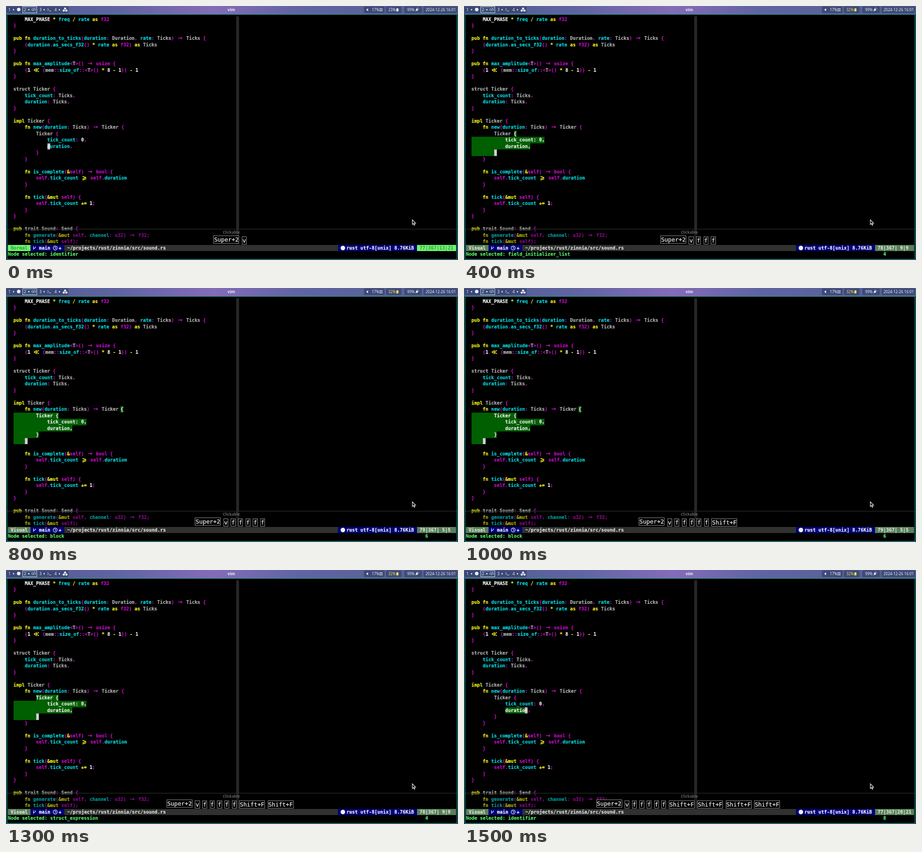
Write an HTML page that moves like this. It is 960x540 px and loops after 1.6 s.

```html
<!DOCTYPE html>
<html lang="en">
<head>
<meta charset="utf-8">
<title>Editor node selection</title>
<style>
  html, body { margin: 0; width: 100%; height: 100%; overflow: hidden; background: #000; }
  #stage {
    position: relative; width: 960px; height: 540px; overflow: hidden; background: #000;
    font: bold 9.95px/13.5px "DejaVu Sans Mono", monospace;
    -webkit-text-stroke: .22px currentColor;
  }
  #stage div, #stage > svg { position: absolute; white-space: pre; }
  #stage > svg { left: 0; top: 0; font: 8px "Noto Sans", sans-serif; -webkit-text-stroke: 0; }
  #stage .row { height: 13.5px; }
  .keyword { color: #eded1c; }
  .name { color: #08d5db; }
  .type { color: #adadad; }
  .mark { color: #c20bc2; }
  .plain { color: #ededed; }
  .wide {
    display: inline-block; width: 2ch; height: 10px; text-align: center; line-height: 10px;
    font-family: "DejaVu Sans", sans-serif;
  }
  .wide i { display: block; margin: 0 -4px; font-style: normal; font-size: 12px; }
  .selected { background: #005f00; color: #f0f0f0; }
  .cursor { background: #bababa; color: #ececec; }
  #split { left: 489px; top: 22px; width: 6px; height: 485px; background: #262826; }
  #shade { left: 2px; right: 2px; top: 474px; height: 33px; background: rgba(0,0,0,.3); border-top: 1px solid #303434; }
  #caption {
    left: 0; width: 957px; top: 475px; text-align: center; color: #626262;
    font: bold 8px/12px "Noto Sans", sans-serif; -webkit-text-stroke: 0;
  }
  #keys {
    left: 0; width: 957px; top: 488px; display: flex; justify-content: center;
    color: #f0f0f0; font: 12.4px/15px "DejaVu Sans Mono", monospace;
  }
  #keys span {
    flex: none; height: 15px; margin: 1.5px 5.4px 0 0; padding: 0 .4px;
    border: 1px solid #8c8c8c; background: #000;
  }
  #keys span:first-child { margin-top: 0; }
  #status div { height: 13.5px; top: 507.75px; }
  #path { left: 124px; width: 581px; background: #303230; color: #dce0dc; }
  .blue { background: #00007c; color: #ededf5; }
  .mode { background: #5a7f5c; color: #d6e6d2; }
  .normal .mode { background: #6cf76c; color: #3da548; }
  #message, #count { top: 521.25px; color: #58ec68; }
</style>
</head>
<body>
<div id="stage">
  <div id="split"></div>
  <div id="code"></div>
  <div id="selection"></div>
  <div id="shade"></div>
  <div id="caption">Clickable</div>
  <div id="keys"></div>
  <div id="status">
    <div id="path"> ~/projects/rust/zinnia/src/sound.rs</div>
    <div id="mode" class="mode" style="left:4px;width:48px"></div>
    <div class="blue" style="left:52px;width:72px">   main   +</div>
    <div class="blue" style="left:705px;width:167.5px">   rust utf-8[unix] 8.76KiB</div>
    <div id="position" class="mode" style="left:872.5px;width:83.5px"></div>
  </div>
  <div id="message" style="left:4px"></div>
  <div id="count" style="left:890.5px"></div>

  <svg width="960" height="540" fill="#eceef6">
    <defs>
      <linearGradient id="sky">
        <stop offset="0" stop-color="#4f5c8e"/>
        <stop offset=".25" stop-color="#6064a2"/>
        <stop offset=".46" stop-color="#856cb8"/>
        <stop offset=".65" stop-color="#6064a2"/>
        <stop offset="1" stop-color="#53608f"/>
      </linearGradient>
    </defs>
    <rect width="960" height="17" fill="url(#sky)"/>
    <g fill="#2c3860" fill-opacity=".55">
      <rect x="1" y="1" width="132" height="14" rx="2"/>
      <rect x="760" y="1" width="44" height="14" rx="2"/>
      <rect x="807" y="1" width="33" height="14" rx="2"/>
      <rect x="846" y="1" width="37" height="14" rx="2"/>
      <rect x="887" y="1" width="71" height="14" rx="2"/>
    </g>
    <rect x="1.75" y="17.75" width="956.5" height="521" fill="none" stroke="#2a9499" stroke-width="1.5"/>
    <rect x="35.5" y="1.5" width="30" height="13" fill="#3f5079" stroke="#c4d4e8"/>
    <text x="5" y="11">1</text>
    <text x="38" y="11">2</text>
    <text x="71" y="11">3</text>
    <text x="103" y="11">4</text>
    <g id="dots">
      <circle cx="16" cy="8" r="1.4"/>
      <circle cx="48.5" cy="8" r="1.4"/>
      <circle cx="81" cy="8" r="1.4"/>
      <circle cx="113.5" cy="8" r="1.4"/>
    </g>
    <circle cx="27" cy="7.5" r="3.7"/>
    <g fill="none" stroke="#eceef6">
      <path d="M57 5l-2.500 2.500 2.500 2.500M61 5l2.500 2.500-2.500 2.500M60 4.500l-2 6"/>
      <path d="M88 5l2.500 2.500-2.500 2.500M91.500 10.500h4"/>
      <path d="M793 5.500h7M793 8h7M793 10.500h7"/>
    </g>
    <path d="M125.500 3l2.300 1.200v2.400l-2.300 1.200-2.300-1.200V4.200zM122.700 7.300l2.300 1.200v2.400l-2.300 1.200-2.300-1.200V8.500zM128.300 7.300l2.300 1.200v2.400l-2.300 1.200-2.300-1.200V8.500z"/>
    <path d="M765 8l4-3v6z"/>
    <path d="M870 11l1.500-2c-1-2 0-3 1.500-3.500l2 2.700c-1 1.500-2 2-3.500 1.500zM873 5l2-2M875.500 7l2-2" stroke="#eceef6"/>
    <text x="478.5" y="11.3" text-anchor="middle" font-size="8.7" font-weight="bold">vim</text>
    <text x="777" y="11">17%</text>
    <g id="load">
      <text id="percent" x="812" y="11"></text>
      <rect x="829" y="5" width="4.5" height="6.5" rx="1"/>
    </g>
    <text x="852" y="11">99%</text>
    <text x="891" y="11">2024-12-26 16:01</text>

    <g fill="none" stroke="#ededf5" stroke-width="1.2">
      <path d="M58.500 511v7M62.500 511.500v1.500q0 2-4 2.500"/>
      <circle cx="104.500" cy="514.500" r="4.200"/>
      <path d="M104.500 512v3h2.500"/>
    </g>
    <circle cx="715.500" cy="514.500" r="4.800"/>
    <path d="M863 454.500v10l2.300-2 1.600 3.600 1.700-.8-1.600-3.400h3.100z" fill="#111" stroke="#dedede" stroke-width="1.2"/>
  </svg>
</div>

<script>
const LOOP = 1600;
const ROW = 13.5;
const $ = id => document.getElementById(id);

const source = `    MAX_PHASE * freq / rate as f32
}

pub fn duration_to_ticks(duration: Duration, rate: Ticks) -> Ticks {
    (duration.as_secs_f32() * rate as f32) as Ticks
}

pub fn max_amplitude<T>() -> usize {
    (1 << (mem::size_of::<T>() * 8 - 1)) - 1
}

struct Ticker {
    tick_count: Ticks,
    duration: Ticks,
}

impl Ticker {
    fn new(duration: Ticks) -> Ticker {
        Ticker {
            tick_count: 0,
            duration,
        }
    }

    fn is_complete(&self) -> bool {
        self.tick_count >= self.duration
    }

    fn tick(&mut self) {
        self.tick_count += 1;
    }
}

pub trait Sound: Send {
    fn generate(&mut self, channel: u32) -> f32;
    fn tick(&mut self);`.split("\n");

const ligatures = { "->": "→", "<<": "≪", ">=": "⩾" };
const rules = [
  [/^(pub|fn|as|impl|mut)$/, "keyword"],
  [/^(self|f32|u32|usize|bool|->)$/, "mark"],
  [/^(MAX_PHASE|\d+)$/, "plain"],
  [/^(struct|trait|mem|[A-Z]\w*)$/, "type"],
  [/^\w+$/, "name"],
  [/^([*\/&-]|<<|>=|\+=)$/, "keyword"],
  [/./, "mark"],
];

function add(parent, tag, className, text) {
  const node = document.createElement(tag);
  node.className = className;
  node.textContent = text;
  return parent.appendChild(node);
}

function addRow(parent, row, col, className, text) {
  const node = add(parent, "div", `row ${className}`, text);
  node.style.top = `${21.75 + row * ROW}px`;
  node.style.left = `calc(15.8px + ${col}ch)`;
  return node;
}

source.forEach((line, row) => {
  const node = addRow($("code"), row, 0, "", "");
  for (const token of line.match(/\s+|\w+|->|<<|>=|\+=|./g) || []) {
    const className = rules.find(([pattern]) => pattern.test(token))[1];
    if (ligatures[token]) {
      add(add(node, "span", `${className} wide`, ""), "i", "", ligatures[token]);
    } else {
      add(node, "span", className, token);
    }
  }
});

// Each node runs from [row, column] to the cursor cell, inclusive.
const nodes = {
  start: { label: "identifier", from: [20, 12], to: [20, 12], place: "77|367|13|21", count: 1 },
  identifier: { label: "identifier", from: [20, 12], to: [20, 19], place: "77|367|20|21", count: 8 },
  list: { label: "field_initializer_list", from: [18, 15], to: [21, 8], place: "78|367| 9|9", count: 4 },
  struct: { label: "struct_expression", from: [18, 8], to: [21, 8], place: "78|367| 9|9", count: 4 },
  block: { label: "block", from: [17, 38], to: [22, 4], place: "79|367| 5|5", count: 6 },
};

// Start time, selected node, presses of f, presses of Shift+F.
const steps = [
  [0, "start", 0, 0],
  [100, "start", 0, 0],
  [200, "identifier", 1, 0],
  [300, "identifier", 2, 0],
  [400, "list", 3, 0],
  [500, "struct", 3, 0],
  [600, "block", 4, 0],
  [700, "block", 5, 0],
  [1000, "block", 5, 1],
  [1200, "block", 5, 2],
  [1300, "struct", 5, 2],
  [1400, "list", 5, 3],
  [1500, "identifier", 5, 4],
];

function drawSelection({ from, to }) {
  const layer = $("selection");
  layer.replaceChildren();
  for (let row = from[0]; row <= to[0]; row++) {
    const start = row === from[0] ? from[1] : 0;
    const end = row === to[0] ? to[1] : source[row].length;
    if (end > start) addRow(layer, row, start, "selected", source[row].slice(start, end));
  }
  addRow(layer, to[0], to[1], "cursor", source[to[0]][to[1]]);
}

function render(index) {
  const [time, name, grow, shrink] = steps[index];
  const node = nodes[name];
  const normal = time === 0;
  drawSelection(node);

  $("keys").replaceChildren();
  const keys = ["Super+2", "v", ...Array(grow).fill("f"), ...Array(shrink).fill("Shift+F")];
  keys.forEach(key => add($("keys"), "span", "", key));

  $("status").className = normal ? "normal" : "";
  $("mode").textContent = normal ? " Normal" : " Visual";
  $("position").textContent = ` ${node.place}`;
  $("message").textContent = `Node selected: ${node.label}`;
  $("count").textContent = normal ? "" : node.count;
  $("percent").textContent = normal ? "23%" : "32%";
  $("load").setAttribute("fill", normal ? "#eceef6" : "#e8e05a");
}

let shown = -1;
function tick() {
  const time = performance.now() % LOOP;
  const index = steps.findLastIndex(step => step[0] <= time);
  if (index !== shown) render(shown = index);
  requestAnimationFrame(tick);
}
tick();
</script>
</body>
</html>
```
